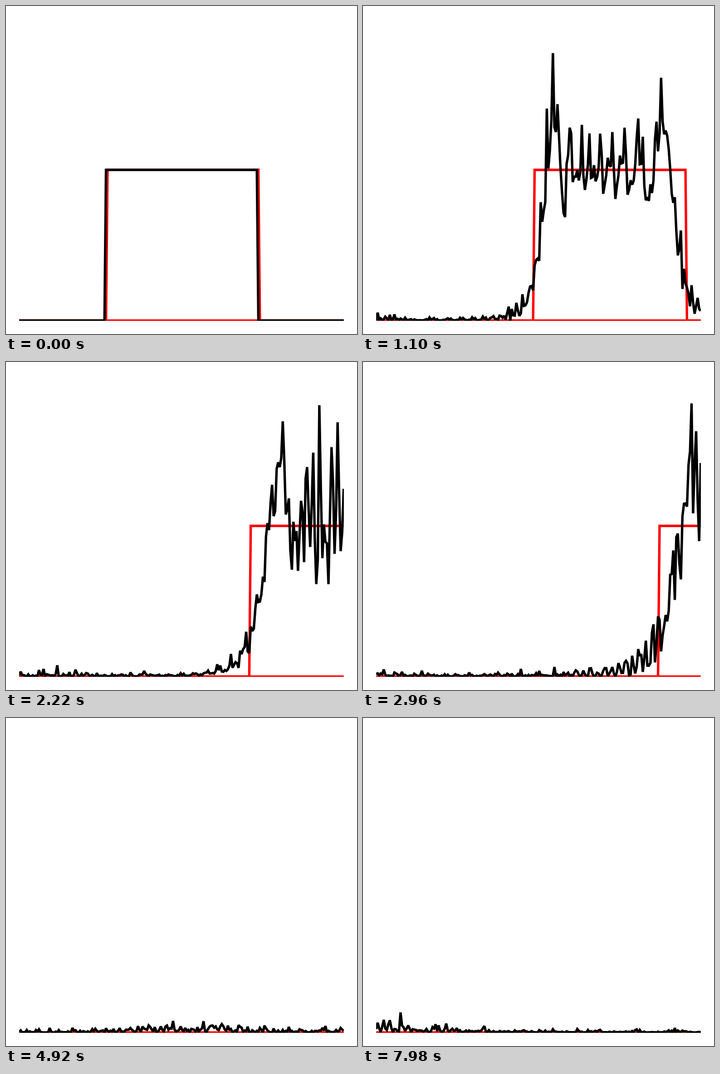
These frames come from a looping animation (774x723 px, 8000 ms). An HTML page with a canvas:

```html
<!DOCTYPE html>
<html lang="en">
<head>
<meta charset="utf-8">
<title>Wave packet on a lattice</title>
<style>
  html, body { margin: 0; width: 100%; height: 100%; overflow: hidden; background: #fff; }
  canvas { display: block; }
</style>
</head>
<body>
<canvas id="stage" width="774" height="723"></canvas>
<script>
const ctx = document.getElementById('stage').getContext('2d');

const LOOP = 8000, FRAMES = 172;
const CELLS = 214, BOX_START = 57, BOX_WIDTH = 100;
const LEFT = 29, RIGHT = 745, BOTTOM = 694, BASE = 693.4, UNIT = 332.2, CELL = 3.36;

// Lattice energy J (1 - cos k); J is chosen so the packet moves one cell per time unit.
const WAVE_NUMBER = Math.PI / 4, J = 1 / Math.sin(WAVE_NUMBER);
const SHIFT_PER_FRAME = 2, SUBSTEPS = 4, DT = SHIFT_PER_FRAME / SUBSTEPS;
// Phase of the partly absorbing right end; the left end is a hard wall.
const END_COS = Math.cos(0.6), END_SIN = Math.sin(0.6);

const inBox = (cell, shift) =>
  cell >= BOX_START + shift && cell < BOX_START + BOX_WIDTH + shift ? 1 : 0;

// Adds factor * (energy operator applied to source); end is the value beyond the last cell.
function addEnergy(target, source, end, factor) {
  for (let x = 0; x < CELLS; x++) {
    const left = x ? source[x - 1] : 0;
    const right = x < CELLS - 1 ? source[x + 1] : end;
    target[x] += factor * J * (source[x] - (left + right) / 2);
  }
}

function simulate() {
  const wave = f => Float64Array.from({ length: CELLS }, (_, x) => inBox(x, 0) * f(WAVE_NUMBER * x));
  const re = wave(Math.cos), im = wave(Math.sin), last = CELLS - 1;
  const densities = [];
  for (let n = 0; n < FRAMES; n++) {
    densities.push(re.map((a, x) => a * a + im[x] * im[x]));
    for (let s = 0; s < SUBSTEPS; s++) {
      addEnergy(re, im, END_COS * im[last] + END_SIN * re[last], DT);
      addEnergy(im, re, END_COS * re[last] - END_SIN * im[last], -DT);
    }
  }
  return densities;
}

const densities = simulate();

// Three pictures every 140 ms, held for 20, 100 and 20 ms.
function frameAt(time) {
  const rest = time % 140;
  return 3 * Math.floor(time / 140) + (rest >= 120 ? 2 : rest >= 20 ? 1 : 0);
}

function plot(valueAt, color) {
  ctx.strokeStyle = color;
  ctx.beginPath();
  for (let x = 0; x < CELLS; x++) ctx.lineTo(LEFT + x * CELL, BASE - UNIT * valueAt(x));
  ctx.stroke();
}

function draw(now) {
  const n = Math.min(frameAt(now % LOOP), FRAMES - 1);
  ctx.fillStyle = '#fff';
  ctx.fillRect(0, 0, 774, 723);
  ctx.save();
  ctx.beginPath();
  ctx.rect(LEFT, 0, RIGHT - LEFT, BOTTOM);
  ctx.clip();
  ctx.lineWidth = 5.4;
  ctx.miterLimit = 2;
  plot(() => 0, '#f00');
  plot(x => inBox(x, SHIFT_PER_FRAME * n + 1), '#f00');
  plot(x => densities[n][x], '#000');
  ctx.restore();
}

function tick() {
  draw(performance.now());
  requestAnimationFrame(tick);
}
tick();
</script>
</body>
</html>
```
